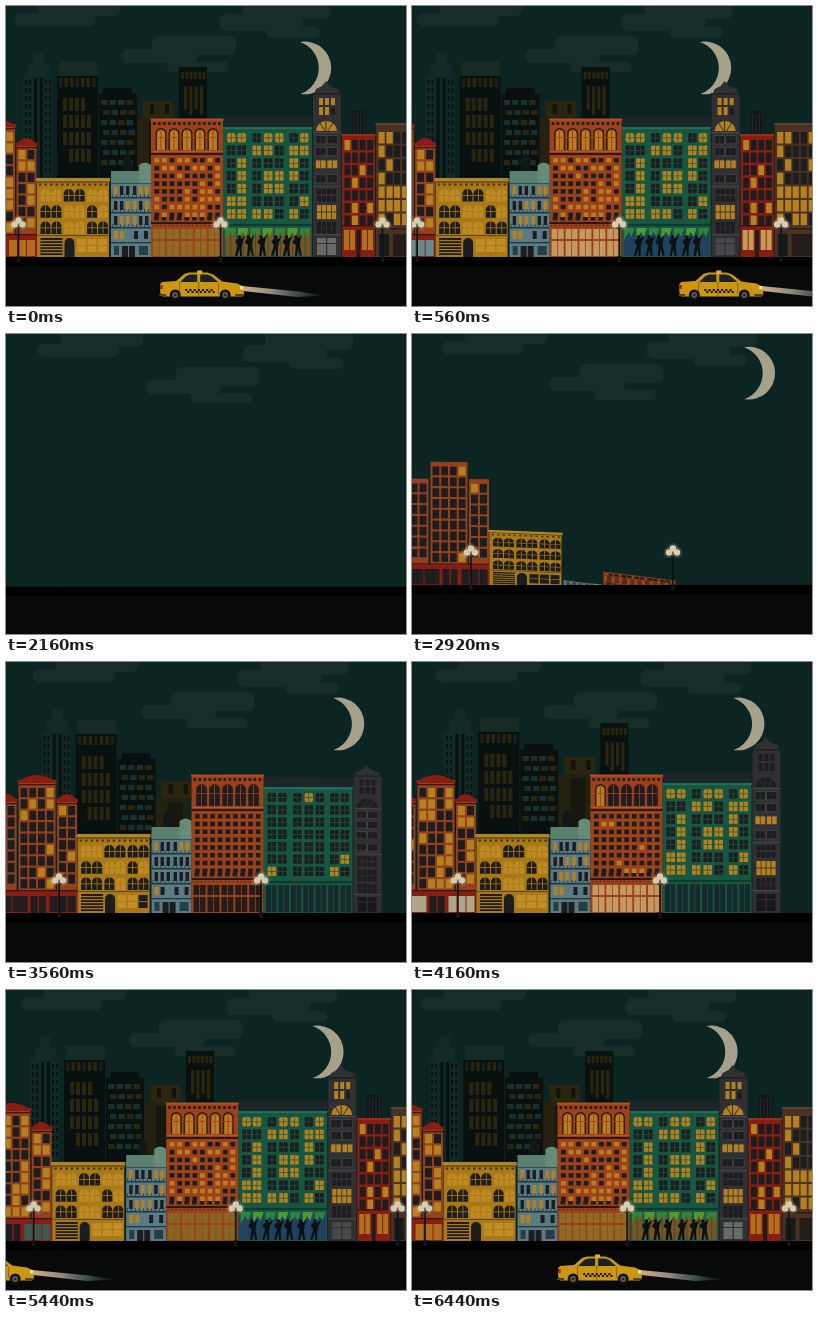
An HTML page for the animation above (6480 ms loop, 400 px wide and 300 px high).

```html
<!DOCTYPE html>
<html lang="en">
<head>
<meta charset="utf-8">
<title>Night city</title>
<style>
html, body { margin: 0; width: 100%; height: 100%; overflow: hidden; background: #0d2522; }
svg { display: block; width: 400px; height: 300px; }
</style>
</head>
<body>
<svg id="stage" viewBox="0 0 400 300" xmlns="http://www.w3.org/2000/svg"></svg>
<script>
const LOOP = 6480, CUT = 1320, GROUND = 251;
const LIT = '#b5801f', DARK = '#1d1d20', OLIVE = '#29250f', BLACK = '#081110';
const PHASES = [3600, 4700, 5900, 6760];
let seed = 11;
const rnd = () => (seed = (seed * 16807) % 2147483647) / 2147483647;
const clamp = v => Math.max(0, Math.min(1, v));
const span = (t, start, length) => clamp((t - start) / length);
const cubicOut = u => 1 - (1 - u) ** 3;
const backOut = u => 1 + 2.70158 * (u - 1) ** 3 + 1.70158 * (u - 1) ** 2;

const rect = (x, y, w, h, fill, extra = '') =>
  `<rect x="${x}" y="${y}" width="${w}" height="${h}" fill="${fill}" ${extra}/>`;
const path = (d, fill, extra = '') => `<path d="${d}" fill="${fill}" ${extra}/>`;
const repeat = (n, fn) => Array.from({ length: n }, (_, i) => fn(i)).join('');
const arch = (x, y, w, h) =>
  `M${x} ${y + h}V${y + w / 2}a${w / 2} ${w / 2} 0 0 1 ${w} 0V${y + h}z`;

// A window that switches on at a given time
const lamp = (on, lit = LIT, dark = DARK) => `data-on="${on}" data-lit="${lit}" data-dark="${dark}"`;
const pane = (x, y, w, h, chance, from, to, lit, dark, extra = '') => {
  const on = rnd() < chance ? from + rnd() * (to - from) : 1e6;
  return rect(x, y, w, h, DARK, lamp(on, lit, dark) + extra);
};
const grid = (xs, ys, w, h, ...light) => ys.map(y => xs.map(x => pane(x, y, w, h, ...light)).join('')).join('');
const steps = (from, pitch, n) => Array.from({ length: n }, (_, i) => from + i * pitch);
// A shop front whose light changes with each phase
const shop = (x, y, w, h, colours) => rect(x, y, w, h, DARK, `data-shop="${colours}"`);

function clouds() {
  return [[31, -8, 83, 18], [8, 7, 82, 13], [236, -8, 88, 21], [213, 8, 84, 17], [260, 21, 54, 11],
    [146, 30, 84, 19], [116, 43, 76, 14], [161, 56, 62, 10]]
    .map(([x, y, w, h]) => rect(x, y, w, h, '#162d29', `rx="${Math.min(7, h / 2)}"`)).join('');
}

function towers() {
  const slim = rect(17, 69, 29, 103, '#112a28') + rect(22, 57, 21, 12, '#132b28') + rect(27, 47, 11, 10, '#132b28') +
    repeat(2, i => rect(28 + i * 6, 72, 3, 100, BLACK)) +
    [19, 23, 39, 43].map(x => repeat(12, i => rect(x, 74 + i * 8, 1.7, 5, BLACK))).join('');
  const wide = rect(53, 56, 39, 14, '#162b27') + rect(51, 70, 41, 102, BLACK) +
    repeat(7, i => rect(53 + i * 5.5, 72, 3.5, 9, i % 3 ? OLIVE : '#17201a')) +
    repeat(4, r => repeat(5, c => rnd() < .78 ? rect(57 + c * 6, 92 + r * 17, 4, 13, OLIVE) : ''));
  const banded = rect(97, 82, 29, 6, BLACK) + rect(93, 88, 38, 84, BLACK) +
    repeat(7, r => repeat(4, c => rect(95 + c * 8.5 + (r % 2) * 2, 94 + r * 10, 6.5, 5, rnd() < .35 ? OLIVE : '#1a302a')));
  const olive = rect(137, 95, 31, 17, '#2a250f') + rect(144, 98, 4, 10, '#12140c') + rect(159, 98, 4, 10, '#12140c') +
    rect(131, 112, 31, 62, '#252110') + rect(143, 116, 15, 58, '#16170d');
  const tall = rect(173, 61, 28, 55, BLACK) + repeat(6, i => rect(175 + i * 4.3, 66, 3, 7, OLIVE)) +
    repeat(4, i => rect(178 + i * 5.3, 80, 3.2, i % 2 ? 29 : 24, OLIVE));
  return [slim, wide, banded, olive, tall];
}

function redBlock() {
  const body = '#93401d', red = '#891d13';
  const wing = (x, w, top, cols) => rect(x, top, w, 230 - top, body) +
    grid(steps(x + 2, (w - 2) / cols, cols), steps(top + 5, 11.4, Math.floor((226 - top) / 11.4)),
      (w - 2) / cols - 2, 9.2, .45, 2850, 4300);
  const cap = (x, w, top) => path(`M${x - 1} ${top + 6}Q${x + w / 2} ${top - 8} ${x + w + 1} ${top + 6}z`, red) +
    rect(x - 1, top + 4, w + 2, 3, red) + rect(x, top + 8, w, 1.3, '#391714');
  const glass = ['#201d1f', '#afa588', '#3d5753', '#b06d20', '#678991'];
  return wing(-50, 20, 139, 2) + wing(-28, 37, 121, 4) + wing(10.5, 20, 139, 2) +
    `<g id="caps">${cap(-50, 20, 133) + cap(-28, 37, 114) + cap(10.5, 20, 133)}</g>` +
    rect(-50, 229, 81, 22, red) + rect(-50, 228, 81, 1.2, '#2b1715') +
    [-50, -34, 3, 12, 21].map(x => shop(x, 234, x < 0 ? 15 : 8, 16, glass)).join('') +
    rect(-16, 234, 15, 17, DARK) + rect(-9, 234, 1.5, 17, red);
}

function yellowBlock() {
  const wall = '#a97817';
  const unlit = [[0, 1, 0], [1, 0, .5], [1, 0, 1]];
  return rect(31, 175, 72, 76, wall) + rect(30, 172, 74, 4, '#b18429') + rect(30, 175.5, 74, 1, '#40351a') +
    repeat(13, i => rect(33 + i * 5.5, 177.5, 2.5, 2.2, '#4a3918')) +
    unlit.map((row, r) => row.map((off, g) => repeat(2, c => {
      const x = 34.5 + g * 23.3 + c * 11, y = 183 + r * 16.2;
      const on = off === 1 || (off && !c) ? 1e6 : 3150 + rnd() * 700;
      return path(arch(x, y, 10, 12.5), DARK, lamp(on, '#bd8a23')) + rect(x + 4.6, y, .8, 12, wall) + rect(x, y + 6, 10, .8, wall);
    })).join('')).join('') +
    rect(31, 229, 72, 1, '#604a1c') + rect(34.5, 232, 22, 18, DARK) +
    repeat(6, i => rect(34.5, 234 + i * 3, 22, 1.2, wall)) +
    path(arch(58.5, 232, 10, 19), DARK) +
    repeat(3, i => pane(71 + i * 10.5, 233, 9, 13, 1, 3200, 3700, '#c08d27')) + rect(71, 239, 30, .8, wall);
}

function blueBlock() {
  return path('M117 165v-11q4-13 9 0v11z', '#101817') + rect(105, 172, 40, 79, '#5b7b84') +
    rect(105, 165, 40, 12, '#5b806f') + path('M133 178v-19q6-5 12 0v19z', '#668b79') +
    rect(105, 177, 40, 1, '#344f50') +
    grid([108, 114, 120, 127, 133, 139], [180, 195, 210], 3.4, 9, .6, 3250, 4200) +
    [191, 206, 221].map(y => rect(105, y, 40, 1.5, '#22383d') + repeat(10, i => rect(106 + i * 4, y - 3, .7, 3, '#22383d'))).join('') +
    grid([108, 114, 128, 138], [225], 4, 8, .5, 3300, 4200) + rect(105, 236, 40, 1.3, '#22383d') +
    rect(116, 240, 13, 11, DARK) + rect(122, 240, 1, 11, '#5b7b84') + rect(108, 240, 5, 9, '#283d43') + rect(133, 240, 9, 9, '#283d43');
}

function orangeBlock() {
  const wall = '#9b421b';
  const glass = ['#241c1a', '#c49863', '#876422', '#8f6b25', '#c49863'];
  return rect(145, 113, 72, 138, wall) + rect(144.5, 112.5, 73, 2, '#ad5125') +
    repeat(14, i => rect(147 + i * 5, 116, 2.6, 3, '#2c1a18')) +
    repeat(5, i => {
      const x = 149.5 + i * 13;
      return path(arch(x, 122, 11, 22), '#30201d') +
        path(arch(x + 1.5, 124, 8, 20), DARK, lamp(i ? 4300 + i * 150 : 3900, '#bd7b20')) +
        rect(x + 5, 123, .9, 21, wall) + rect(x, 131, 11, .8, wall);
    }) +
    rect(145, 147, 72, 2, '#2b1918') + rect(145, 145, 72, 1, '#b45a2a') +
    grid(steps(148.5, 7.6, 9), steps(152, 7.8, 8), 4.7, 4.5, .48, 3900, 5300, '#bd7c20') +
    rect(145, 216, 72, 2, '#2b1918') + repeat(9, i => rect(148 + i * 7.6, 211, 4.7, 3.5, DARK)) +
    repeat(18, i => rect(146 + i * 4, 219, 2, 1.2, '#582819')) +
    repeat(5, i => shop(147 + i * 13.9, 223, 12, 10, glass) + shop(147 + i * 13.9, 235, 12, 15, glass)) +
    repeat(10, i => rect(152.7 + i * 6.95, 222, .8, 29, wall));
}

function greenBlock() {
  const wall = '#175640', xs = [221, 231.5, 246.5, 258, 269, 283.5, 294];
  const glass = ['#152a2a', '#152a2a', '#203f63', '#795323', '#203f63'];
  return rect(217, 111, 89, 11, '#1e2529') + rect(217, 121, 89, 130, wall) + rect(217, 121, 89, 2, '#20705a') +
    steps(127, 12.7, 7).map(y => xs.map(x => pane(x, y, 8.5, 9.5, .57, 3450, 4100, LIT, DARK, y < 130 ? 'rx="2.5"' : '') +
      rect(x + 3.9, y, .7, 9.5, wall) + rect(x, y + 4.5, 8.5, .7, wall)).join('')).join('') +
    rect(217, 218, 89, 2, '#0f382e') +
    repeat(7, i => shop(219.5 + i * 12.4, 222, 10.5, 28, glass) +
      rect(224.4 + i * 12.4, 222, .8, 28, wall)) +
    `<g id="party">` + repeat(7, i => {
      const x = 219.5 + i * 12.4;
      return path(`M${x} 222h10.5l-3 9-3-5-4.5 8z`, i % 2 ? '#4c9b32' : '#2f843c');
    }) + repeat(6, i => `<g class="dancer">` +
      `<circle cx="${232 + i * 12}" cy="231" r="1.8" fill="#0b1113"/>` +
      path(`M${230 + i * 12} 233l5-1 3-3-2 6-1 5 1 10h-2l-1-7-2 7h-2l2-11-3-3z`, '#0b1113') + '</g>') + '</g>';
}

function greyBlock() {
  const wall = '#303033', frame = '#45464a';
  return path('M307 251V91l3-8 6-3 4-5 4 5 8 3 3 8v160z', wall) + rect(306, 87, 29, 2, '#222326') +
    repeat(3, i => pane(313 + i * 6, 92, 4, 7, 1, 4300, 4800) + pane(313 + i * 6, 101, 4, 8, i < 2 ? 1 : 0, 4300, 4800)) +
    path('M310 125a10.5 10 0 0 1 21 0z', DARK, lamp(4650)) + path('M320 115v10M314 117l5 8M327 117l-5 8', 'none', `stroke="${wall}"`) +
    rect(307, 126, 28, 1.2, frame) +
    [130, 142, 154.5, 169].map((y, r) => [310, 321.5].map(x =>
      rect(x - .7, y - .7, 11, 9, frame) + rect(x, y, 9.6, 7.5, DARK, lamp(r === 2 ? 3600 : 1e6)) + rect(x + 4.4, y, .7, 7.5, wall)).join('')).join('') +
    rect(307, 180, 28, 1, frame) + grid([311, 316, 321, 326], [183, 190, 216, 222], 4, 5.5, 0) +
    grid([311, 316, 321, 326], [199, 206.5], 4.2, 6.6, 1, 3600, 3750) +
    rect(307, 228, 28, 1.3, frame) + shop(311, 232, 19, 17, ['#18181a', '#18181a', '#48494a', '#696b69', '#45474a']) +
    rect(320, 232, 1.3, 18, wall) + rect(311, 237, 19, 1, wall);
}

function crimsonBlock() {
  const glass = [DARK, '#b07022', '#b07022', '#b16f20', '#c99a57'];
  return rect(346, 105, 14, 25, '#111719') + repeat(4, i => rect(347.5 + i * 3.4, 107, 1, 21, '#252b2c')) +
    rect(336, 129, 33, 122, '#861e12') + rect(335.5, 128, 34, 2, '#a02a18') +
    grid(steps(338.5, 7.6, 4), steps(134, 12.6, 7), 5.8, 10, .25, 4550, 5200) +
    rect(336, 219, 33, 1.5, '#3b1512') + shop(338, 224, 11, 20, glass) + shop(356, 224, 11, 20, glass) +
    rect(350.5, 224, 4, 27, DARK) + rect(343, 224, 1, 20, '#861e12') + rect(361, 224, 1, 20, '#861e12');
}

function brownBlock() {
  return rect(370, 118, 52, 133, '#493221') + rect(369.5, 117, 53, 2, '#584031') +
    grid([372.5, 380.5, 388, 396, 404, 412], steps(126, 13.6, 7), 6.2, 11.5, .5, 4650, 5300) +
    rect(370, 222, 52, 1.5, '#291e18') + rect(373, 228, 10, 22, '#151a1b') + rect(387, 228, 32, 22, '#241c18');
}

const BLOCKS = [
  { x: -50, start: 2480, art: redBlock }, { x: 31, start: 2690, art: yellowBlock },
  { x: 105, start: 2908, art: blueBlock }, { x: 217, start: 3080, art: greenBlock },
  { x: 145, start: 2898, art: orangeBlock }, { x: 307, start: 3240, art: greyBlock },
  { x: 336, start: 4180, art: crimsonBlock }, { x: 370, start: 4260, art: brownBlock }
];

function streetLamp(x) {
  const globe = (dx, y) => `<circle cx="${x + dx}" cy="${y}" r="5.5" fill="#d9c99a" opacity=".18"/>` +
    `<circle cx="${x + dx}" cy="${y}" r="3.2" fill="#d5ccb1"/>`;
  return rect(x - .8, 217, 1.6, 37, '#0c1414') + rect(x - 1.7, 250, 3.4, 6, '#121818') +
    path(`M${x - 4} 221q4 4 8 0`, 'none', 'stroke="#0c1414"') + globe(-4, 218.5) + globe(4, 218.5) + globe(0, 214.5);
}

function taxi() {
  const wheel = x => `<circle cx="${x}" cy="289" r="5.5" fill="#111"/><circle cx="${x}" cy="289" r="2.9" fill="#5c5b50"/>` +
    `<circle cx="${x}" cy="289" r="1.2" fill="#252525"/>`;
  return path('M83 280L140 285.500 165 289.500 138 291 84 285z', 'url(#beam)') +
    path('M1 278l2-2 14-1 8-7 5-1.500h18l6 2 9 7 15 2 6 3 1 8-2 2H3l-2-4z', '#cb9614') +
    path('M21 276l6-6 4-1.500h7v7.500zM41 268.500h7l4 1.500 7 6H41z', '#1b211f') +
    rect(38, 264.5, 5, 3, '#d9b650') + rect(39.2, 276, .8, 14, '#7e5e13') + rect(20, 276, .8, 12, '#7e5e13') + rect(59, 277, .8, 11, '#7e5e13') +
    repeat(14, i => rect(26 + i * 2.1, 283 + (i % 2) * 2, 2.1, 2, '#15140f')) +
    rect(1, 279, 2.5, 4, '#9b2a14') + rect(81, 280, 3, 3.5, '#efe2b0') + rect(0, 288, 7, 2, '#4a4330') + rect(76, 288, 9, 2, '#4a4330') +
    wheel(16) + wheel(66);
}

const stage = document.getElementById('stage');
stage.innerHTML = `<defs><linearGradient id="beam">
    <stop offset="0" stop-color="#d0ad83"/><stop offset=".35" stop-color="#aaa494" stop-opacity=".85"/>
    <stop offset=".7" stop-color="#5d7074" stop-opacity=".6"/><stop offset="1" stop-color="#42555b" stop-opacity=".1"/>
  </linearGradient></defs>` + rect(0, 0, 400, 300, '#0d2522') +
  `<g id="clouds">${clouds()}</g>
  <g id="moon">${path('M294 36A26.4 26.4 0 1 1 294.500 88A27.500 27.500 0 0 0 294 36z', '#a5a18b')}</g>` +
  towers().map(art => `<g class="tower">${art}</g>`).join('') +
  BLOCKS.map(b => `<g class="block">${b.art()}</g>`).join('') +
  `<g id="ground">${rect(0, 251, 400, 60, '#000') + rect(0, 260, 400, 60, '#080a09')}</g>` +
  [12.5, 214.5, 376.5].map(x => `<g class="lamp">${streetLamp(x)}</g>`).join('') +
  `<g id="taxi">${taxi()}</g>` + rect(0, -300, 400, 300, '#000', 'id="curtain"');

const get = id => document.getElementById(id);
const all = q => [...stage.querySelectorAll(q)];
const move = (el, x, y = 0) => el.setAttribute('transform', `translate(${x.toFixed(2)} ${y.toFixed(2)})`);
const [cloudEl, moonEl, groundEl, taxiEl, curtain, caps, party] =
  ['clouds', 'moon', 'ground', 'taxi', 'curtain', 'caps', 'party'].map(get);
const towerEls = all('.tower'), blockEls = all('.block'), lampEls = all('.lamp'), dancers = all('.dancer');
const panes = all('[data-on]').map(el => ({ el, ...el.dataset }));
const shops = all('[data-shop]').map(el => ({ el, colours: el.dataset.shop.split(',') }));

function draw(t) {
  // The scene starts behind the curtain and runs across the loop point
  const s = t < CUT ? t + LOOP : t;
  const pan = 14.32 - 37.43 * Math.sin((s - 5500) * Math.PI / 7840);

  move(cloudEl, pan * .46, -75 * (1 - backOut(span(s, 1790, 900))));
  move(moonEl, pan * .815, 230 * (1 - backOut(span(s, 2320, 1000))));
  towerEls.forEach((el, i) => move(el, pan * .46, 205 * (1 - cubicOut(span(s, 2960 + i * 90, 650)))));

  blockEls.forEach((el, i) => {
    const { x, start } = BLOCKS[i], grow = cubicOut(span(s, start, 700));
    el.setAttribute('visibility', s < start ? 'hidden' : 'inherit');
    el.setAttribute('transform', `translate(${pan + x} ${GROUND}) skewY(${7.5 * (1 - grow)}) scale(1 ${grow}) translate(${-x} ${-GROUND})`);
  });
  caps.setAttribute('visibility', s < 3120 ? 'hidden' : 'inherit');

  move(groundEl, 0, 50 * (1 - cubicOut(span(s, 1780, 560))));
  lampEls.forEach((el, i) => {
    const grow = backOut(span(s, 2250 + i * 60, 450));
    el.setAttribute('transform', `translate(${pan} 256) scale(1 ${Math.max(0, grow)}) translate(0 -256)`);
  });

  for (const p of panes) p.el.setAttribute('fill', s < +p.on ? (p.dark === 'undefined' ? DARK : p.dark) : p.lit);
  const phase = PHASES.filter(at => s >= at).length;
  for (const { el, colours } of shops) el.setAttribute('fill', colours[phase]);
  party.setAttribute('visibility', phase < 2 ? 'hidden' : 'inherit');
  dancers.forEach((el, i) => el.setAttribute('transform', `rotate(${6 * Math.sin(s / 110 + i * 1.7)} ${232 + i * 12} 250)`));

  move(taxiEl, 153 + .202 * (s - LOOP));
  const sweep = clamp((t - CUT) / 508 + .5);
  curtain.setAttribute('y', -300 * Math.cos(Math.PI * sweep));
  curtain.setAttribute('visibility', sweep > 0 && sweep < 1 ? 'visible' : 'hidden');
}

const begin = performance.now();
function tick() {
  draw((performance.now() - begin) % LOOP);
  requestAnimationFrame(tick);
}
draw(0);
requestAnimationFrame(tick);
</script>
</body>
</html>
```
